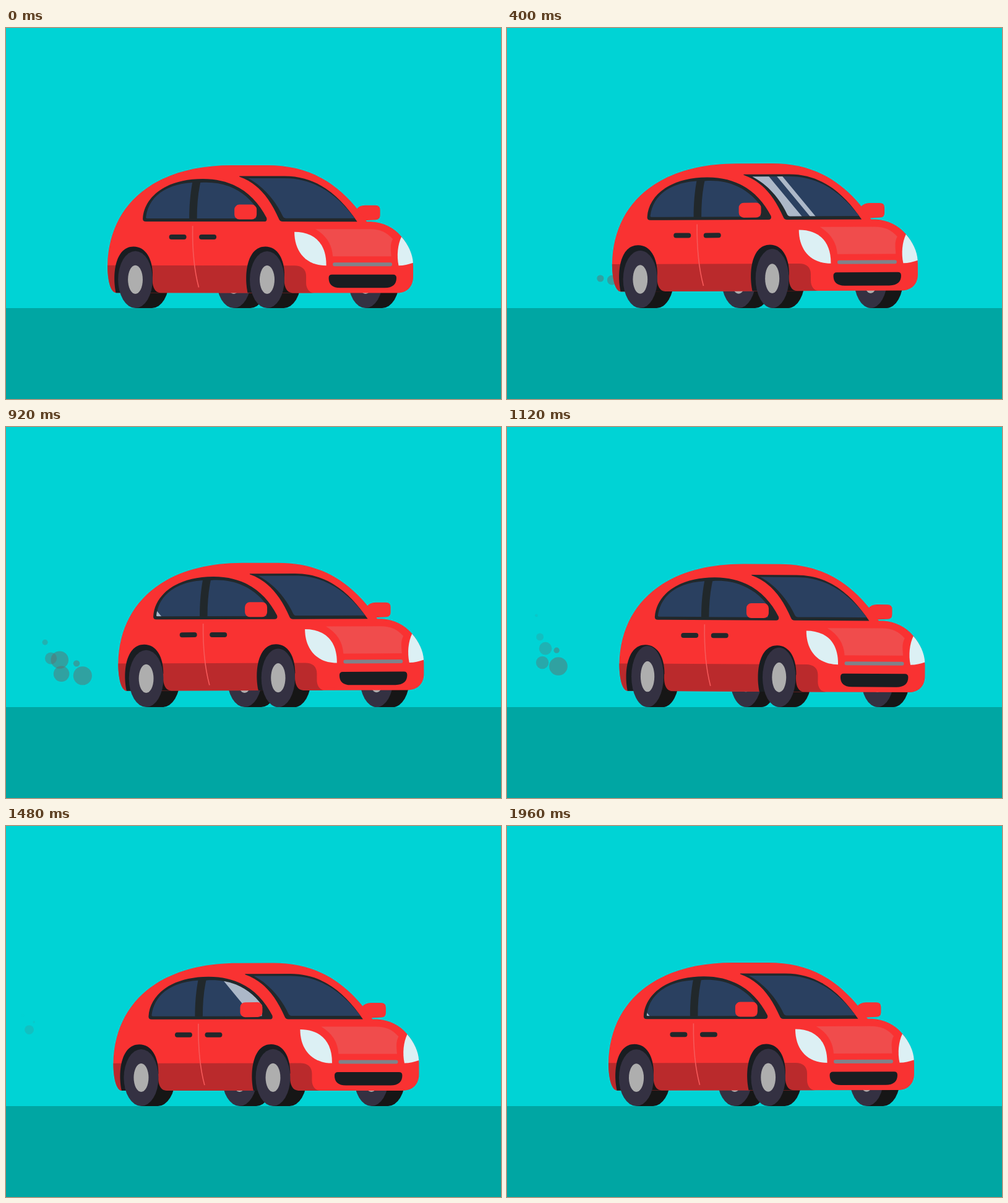
These frames come from a looping animation (800 px wide and 600 px high, 2 s). An HTML page:

```html
<!DOCTYPE html>
<html lang="en">
<head>
<meta charset="utf-8">
<title>Red car</title>
<style>
  html, body { margin: 0; width: 100%; height: 100%; overflow: hidden; background: #00d3d5; }
  svg { display: block; width: 100vw; height: 100vh; }
  .red { fill: #f93232; }
  .dark { fill: #21282b; }
  .arch { fill: #191d21; }
  .tread { fill: #161616; }
  .tyre { fill: #343142; }
  .hub { fill: #aeaeae; }
  .glass { fill: #2a4060; }
  .lamp { fill: #dcf0f4; }
</style>
</head>
<body>
<svg viewBox="0 0 800 600">
  <defs>
    <path id="tread" class="tread" d="M209 361H236A28 46 0 0 1 236 453H209Z"/>
    <g id="face">
      <ellipse class="tyre" cx="209" cy="407" rx="28" ry="46"/>
      <ellipse class="hub" cx="209" cy="407" rx="12" ry="23"/>
    </g>
    <g id="well">
      <path class="tread" d="M225 400H236.500V408C237 420 241 428 250 428.300H225Z"/>
      <path class="arch" d="M177.500 428.300C171 397 177 353.500 206 353.500C226 353.500 237 374 237 400L230 428.300Z"/>
    </g>
    <path id="panes" d="M391 243H450C500 243 535 270 563.500 307.500H452Q448.500 307.500 447 304C436 280 416 256 391 243Z
      M226 306C230 275 255 253 301 250C298 266 296 286 296 308H228Q225.500 308 226 306Z
      M314 250C352 247 384 262 404 290V308H308.500C308.500 288 310 268 314 250Z"/>
    <clipPath id="paneClip"><use href="#panes"/></clipPath>
  </defs>

  <rect width="800" height="600" fill="#00d3d5"/>
  <rect y="453" width="800" height="147" fill="#00a6a3"/>
  <g id="smoke" fill="#646a69"></g>

  <g id="car">
    <g transform="translate(159)">
      <g class="rear"><use href="#tread"/><use href="#face"/></g>
      <g class="front"><use href="#tread" x="213"/><use href="#face" x="213"/></g>
    </g>
    <g class="rear"><use href="#tread"/></g>
    <g class="front"><use href="#tread" x="213"/></g>

    <g id="body">
      <path class="red" d="M566 293Q571 286.500 580 286.500H597Q604.500 286.500 604.500 294V302.500Q604.500 310 597 310L578 311Z"/>
      <path class="red" d="M164 384C166 285 240 222 365 222H422C490 222 540 250 583 313H590C610 314 627 323 638 336C650 350 657 366 658 384V402C658 418 648 428.300 632 428.300H178C168 428 164 405 164 384Z"/>
      <path fill="#ba2a2c" d="M164 384H466C478 384 485 390 485 401V412C485 421 490 428.300 498 428.300H178C168 428 164 405 164 384Z"/>
      <use href="#well"/>
      <use href="#well" x="213"/>

      <path class="dark" d="M377 239.500H450C505 239.500 540 273 567.500 313H447Q442.500 313 441 309C426 275 407 251 377 240.500Z"/>
      <path class="dark" d="M221 308C223 274 257 244 318 244C370 244 402 270 421 307Q422.500 313 417 313H226Q220.500 313 221 308Z"/>
      <use href="#panes" class="glass"/>
      <g clip-path="url(#paneClip)">
        <path id="glare" fill="#acb8c8" d="M-97 225H-66L8 315H-23ZM-53 225H-44L30 315H21Z"/>
      </g>
      <rect class="red" x="369" y="285.500" width="36" height="24" rx="8"/>

      <rect class="dark" x="263.500" y="334" width="28" height="8" rx="4"/>
      <rect class="dark" x="312" y="334" width="28" height="8" rx="4"/>
      <path fill="none" stroke="#f65a5a" stroke-width="1.600" d="M301.500 320C301 355 303 388 311.500 419.500"/>

      <path fill="#f04c4c" d="M500 325H588C605 325 615 330 625 341C620 350 622 360 622.500 369H528C527 350 517 335 500 325Z"/>
      <path class="lamp" d="M466 329.500C497 329.500 518 347 517.500 384C485 384 466 362 466 329.500Z"/>
      <path class="lamp" d="M639 337.500C650 350 657 365 657.800 379.500C650 382 643 384 634.500 384C631 368 633 350 639 337.500Z"/>
      <rect fill="#80828a" x="528" y="379" width="96" height="6" rx="3"/>
      <path class="arch" d="M527 398.500H625.500Q631 398.500 631 404C631 414 625 420 612 420H540C527 420 521.500 414 521.500 404Q521.500 398.500 527 398.500Z"/>
    </g>

    <g class="rear"><use href="#face"/></g>
    <g class="front"><use href="#face" x="213"/></g>
  </g>
</svg>

<script>
const LOOP = 2000, STEP = 40, BOUNCE = 500, SWEEP = 1000, PUFF_LIFE = 1100;

const puffs = [
  { born: 228, drift: 153, rise: 162, bend: 2.15, size: 6.5 },
  { born: 305, drift: 152, rise: 145, bend: 2.5, size: 12 },
  { born: 410, drift: 152, rise: 92, bend: 1.4, size: 15.5 },
  { born: 498, drift: 170, rise: 141, bend: 2.9, size: 13 },
  { born: 580, drift: 155, rise: 118, bend: 1.3, size: 5.2 },
  { born: 655, drift: 168, rise: 152, bend: 2.3, size: 15.5 }
];

const find = sel => document.querySelector(sel);
const place = (el, value) => el.setAttribute('transform', value);
const wave = turns => Math.cos(2 * Math.PI * turns);
const clamp = v => Math.max(0, Math.min(1, v));

const car = find('#car'), body = find('#body'), glare = find('#glare');
for (const puff of puffs) {
  puff.dot = document.createElementNS('http://www.w3.org/2000/svg', 'circle');
  find('#smoke').append(puff.dot);
}

// Stretch wheels up from the ground, keeping their area
function stretch(selector, x, s) {
  document.querySelectorAll(selector).forEach(el =>
    place(el, `translate(${x} 453) scale(${1 / s} ${s}) translate(${-x} -453)`));
}

function drawCar(t) {
  const bounce = t / BOUNCE;
  const rear = -2.2 + 2.2 * wave(bounce - 0.05);
  const front = -1.95 + 3.2 * wave(bounce - 0.13);
  const tilt = Math.atan((front - rear) / 375) * 180 / Math.PI;

  place(car, `translate(${8.9 - 8.9 * wave(t / LOOP)})`);
  place(body, `translate(0 ${rear}) rotate(${tilt} 200 453)`);
  stretch('.rear', 222, 1.052 - 0.055 * wave(bounce - 0.92));
  stretch('.front', 435, 1.053 - 0.053 * wave(bounce - 0.01));

  const sweep = clamp((t % SWEEP - 20) / 960);
  place(glare, `translate(${405 + 199 * wave(sweep / 2)})`);
}

// Puffs slow down as they drift, lift off, swell, shrink and fade
function drawPuff({ born, drift, rise, bend, size, dot }, t) {
  const p = clamp((t - born) / PUFF_LIFE);
  dot.setAttribute('cx', 195 - drift * p * (2 - p));
  dot.setAttribute('cy', 408 - rise * p ** bend);
  dot.setAttribute('r', Math.max(0, size * Math.sin(Math.PI * p ** 0.6)));
  dot.setAttribute('opacity', 0.48 * clamp((0.9 - p) / 0.4));
}

const start = performance.now();
function tick() {
  const now = (performance.now() - start) % LOOP;
  const t = Math.floor(now / STEP) * STEP;
  drawCar(t);
  puffs.forEach(puff => drawPuff(puff, t));
  requestAnimationFrame(tick);
}
tick();
</script>
</body>
</html>
```
